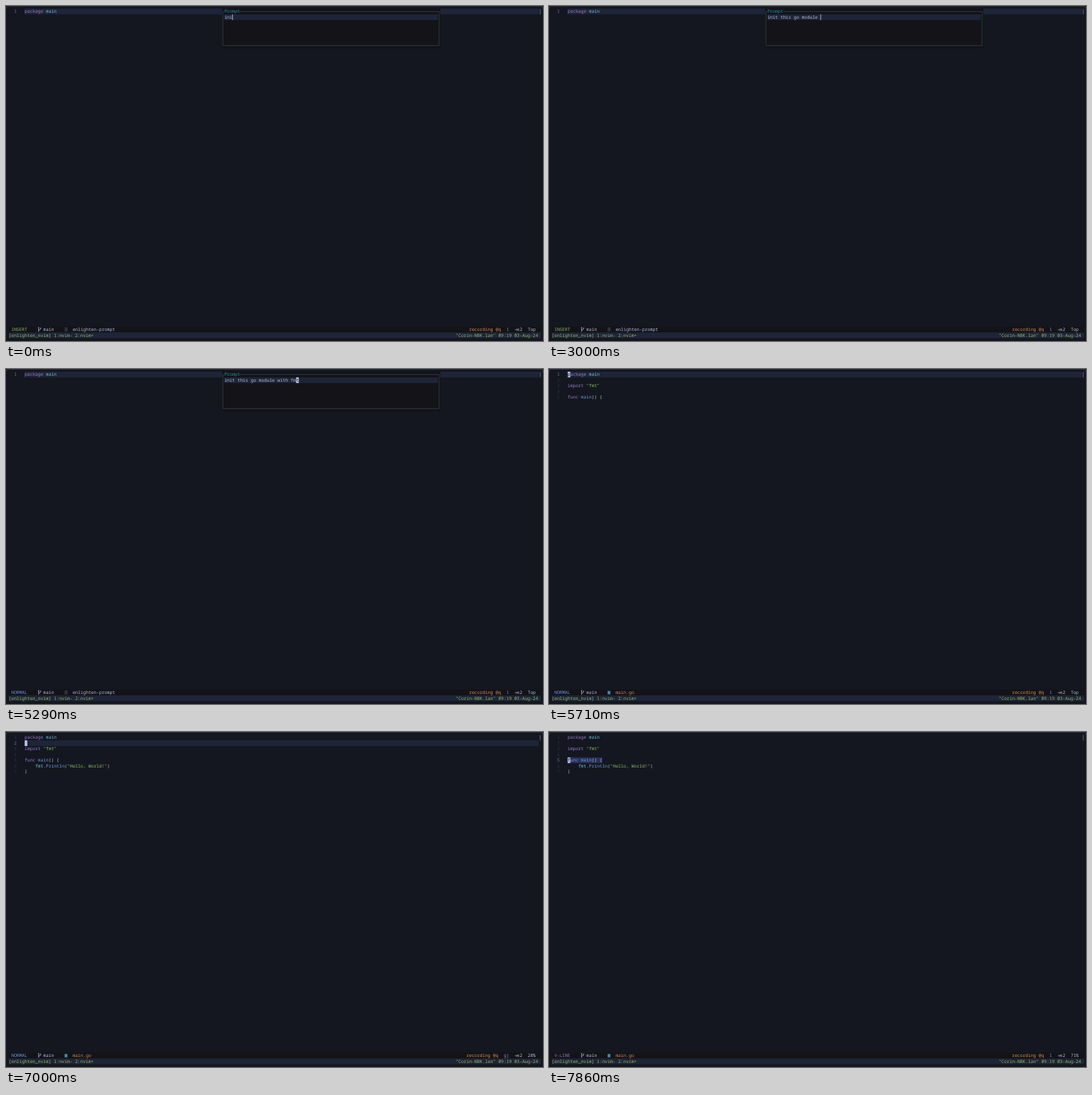
An HTML page that plays this animation: 800x499 px, repeating every 8000 ms.

```html
<!DOCTYPE html>
<html lang="en">
<head>
<meta charset="utf-8">
<title>Editor prompt</title>
<style>
html, body { margin: 0; width: 100%; height: 100%; overflow: hidden; background: #14171f; }
svg { display: block; width: 800px; height: 499px; }
text { font: 6.608px "Noto Sans Mono", "DejaVu Sans Mono", monospace; white-space: pre; text-rendering: geometricPrecision; }
</style>
</head>
<body>
<svg id="stage" viewBox="0 0 800 499"></svg>
<script>
const LOOP = 8000, FPS = 7;
const CW = 3.965, RH = 8.46, LEFT = 4, TOP = 4;
const C = {
  bg: '#14171f', panel: '#131318', line: '#1f2538', select: '#273357',
  fg: '#b4bddf', dim: '#2c3247', num: '#737aa2', cursor: '#b9c3ec',
  purple: '#977bd0', cyan: '#70bde6', blue: '#6c97e8', green: '#8fbf62',
  orange: '#e8894f', teal: '#2592a8', border: '#384850'
};

// Prompt length at each tick; the first wording is replaced from tick 13 on.
const draft = 'init this fo', prompt = 'init this go module with fmt';
const typed = [3, 4, 5, 6, 7, 7, 8, 9, 10, 10, 11, 12, 11, 10, 11, 12, 13, 15, 16, 17, 18,
  20, 20, 21, 22, 23, 24, 25, 26, 27, 27, 28];
const NORMAL_AT = 34, CLOSE_AT = 38, VISUAL_AT = 55;

const code = [
  [['package ', C.purple], ['main', C.cyan]],
  [],
  [['import ', C.purple], ['"fmt"', C.green]],
  [],
  [['func ', C.purple], ['main', C.blue], ['() {', C.fg]],
  [['    ', C.fg], ['fmt', C.cyan], ['.', C.fg], ['Println', C.blue], ['(', C.fg],
    ['"Hello, World!"', C.green], [')', C.fg]],
  [['}', C.fg]]
];

const x = col => LEFT + col * CW;
const y = row => TOP + row * RH;
const box = (left, top, w, h, fill) =>
  `<rect x="${left}" y="${top}" width="${w}" height="${h}" fill="${fill}"/>`;
const cells = (col, row, n, fill) => box(x(col), y(row), n * CW, RH, fill);
const text = (col, row, s, fill) =>
  `<text x="${x(col)}" y="${y(row) + 6.4}" fill="${fill}">${s}</text>`;
const stroke = (d, color, w = 0.8) =>
  `<path d="${d}" fill="none" stroke="${color}" stroke-width="${w}"/>`;
const block = (col, row, ch) => cells(col, row, 1, C.cursor) + text(col, row, ch, C.bg);

function drawCode(count, line, visual, focused) {
  let out = visual ? cells(6, line, 13, C.select) : cells(6, line, 193.2, C.line);
  for (let row = 0; row < count; row++) {
    out += text(2, row, row + 1, row === line ? C.num : C.dim);
    let col = 6;
    for (const [s, color] of code[row]) {
      out += text(col, row, s, color);
      col += s.length;
    }
  }
  out += stroke(`M795.9 ${TOP + 0.5}v8`, '#7f869f', 0.8);
  return focused ? out + block(6, line, code[line].length ? code[line][0][0][0] : ' ') : out;
}

function drawPrompt(n, normal) {
  const len = typed[Math.min(n, typed.length - 1)];
  const s = (n < 13 ? draft : prompt).slice(0, len);
  const l = x(80.5), r = x(161.7), t = y(0.5), b = y(6.5);
  return box(322, TOP, 325, 7 * RH, C.panel) +
    cells(81, 1, 80.2, C.line) +
    stroke(`M${x(81)} ${t}H${l}V${b}H${r}V${t}H${x(87)}`, C.border) +
    text(81, 0, 'Prompt', C.teal) + text(81, 1, s, C.fg) +
    (normal ? block(81 + len - 1, 1, s[len - 1])
            : box(x(81 + len) - 0.1, y(1), 0.9, RH, C.cursor));
}

function drawStatus(mode, inPrompt, pos, keys) {
  const modeColor = { INSERT: C.green, NORMAL: C.blue, 'V-LINE': C.purple }[mode];
  const row = 56, top = y(row);
  const icon = inPrompt
    ? stroke(`M87.3 ${top + 2}h4M87.3 ${top + 4}h5M87.3 ${top + 6}h4`, '#5d6272', 0.8)
    : box(87.4, top + 1.8, 4, 5, '#3f8fb0');
  return cells(0, row, 200, C.panel) + text(1, row, mode, modeColor) +
    stroke(`M48.6 ${top + 1}v6.5M48.6 ${top + 5}q3 0 3-2.8M47.7 ${top + 1.4}h1.8M50.7 ${top + 2}h1.7`, C.fg) +
    text(13, row, 'main', C.fg) + icon +
    text(24, row, inPrompt ? 'enlighten-prompt' : 'main.go', inPrompt ? C.fg : C.orange) +
    text(174 - keys.length, row, 'recording @q', C.orange) +
    text(188 - keys.length, row, keys, C.purple) +
    stroke(`M758 ${top + 4.4}h4.6M760.7 ${top + 2.6}l1.9 1.8l-1.9 1.8M763.8 ${top + 2.3}v4.2`, C.fg, 0.7) +
    text(192, row, '2', C.fg) + text(195, row, pos, C.fg);
}

function drawTmux() {
  const right = '"Corin-NBK.lan" 09:19 03-Aug-24';
  return cells(0, 57, 200, C.line) +
    text(0, 57, '[enlighten_nvim] 1:nvim- 2:nvim+', C.green) +
    text(199 - right.length, 57, right, C.green);
}

function render(n) {
  const inPrompt = n < CLOSE_AT, visual = n >= VISUAL_AT;
  const mode = visual ? 'V-LINE' : n < NORMAL_AT ? 'INSERT' : 'NORMAL';
  const count = inPrompt ? 1 : [1, 3, 5, 7][Math.min(n - CLOSE_AT, 3)];
  const line = [48, 51, 53, 54].filter(tick => n >= tick).length;
  const pos = line ? Math.floor(line * 100 / 7 + 100 / 7) + '%' : 'Top';
  const keys = line && !visual ? 'gj' : '1';
  return box(0, 0, 800, 499, C.bg) +
    stroke('M0 5Q0 .4 5 .4H795Q800 .4 800 5', '#3b3e47', 0.8) +
    drawCode(count, line, visual, !inPrompt) +
    (inPrompt ? drawPrompt(n, n >= NORMAL_AT) : '') +
    drawStatus(mode, inPrompt, pos, keys) + drawTmux();
}

const stage = document.getElementById('stage');
const start = performance.now();
let shown = -1;
function tick() {
  const t = (performance.now() - start) % LOOP;
  const n = Math.floor((t + 5) * FPS / 1000) % (LOOP * FPS / 1000);
  if (n !== shown) stage.innerHTML = render(shown = n);
  requestAnimationFrame(tick);
}
tick();
</script>
</body>
</html>
```
